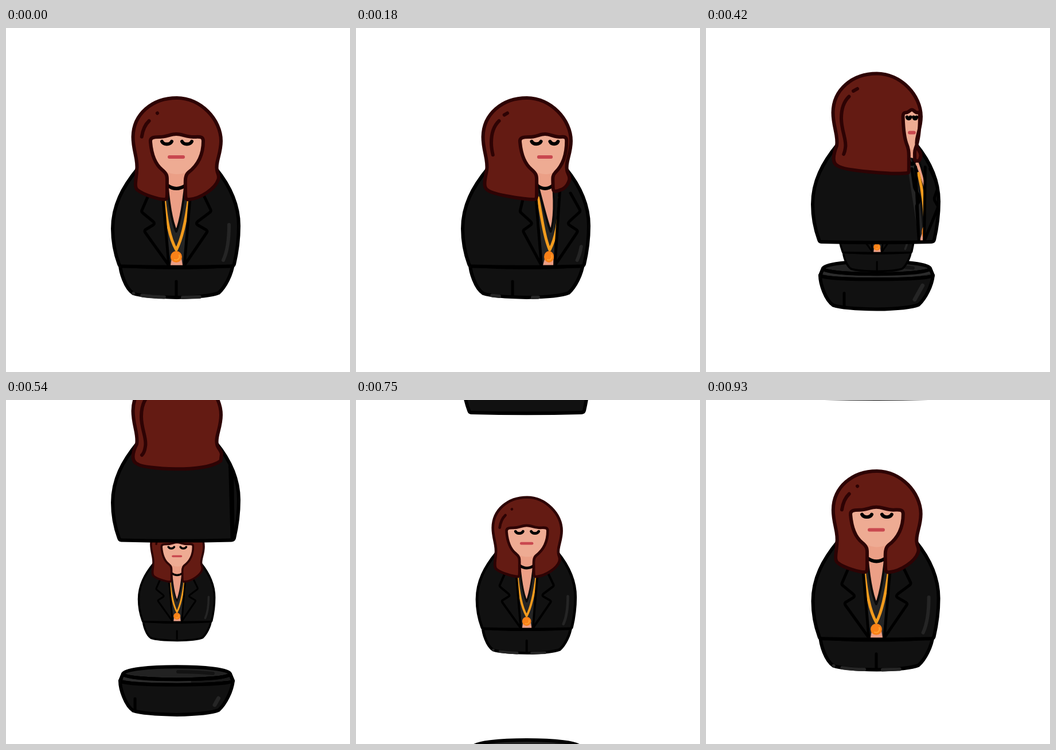
Write an HTML page with a canvas that moves like this. It is 600 px wide and 600 px high and loops after 0.96 s.

```html
<!DOCTYPE html>
<html lang="en">
<head>
<meta charset="utf-8">
<title>Nesting doll</title>
<style>
html, body { margin: 0; width: 100%; height: 100%; overflow: hidden; background: #fff; }
canvas { display: block; width: 600px; height: 600px; }
</style>
</head>
<body>
<canvas id="stage" width="600" height="600"></canvas>
<script>
const ctx = document.getElementById('stage').getContext('2d');
const LOOP = 960, STEP = 30, TURN = 540, MID = 297;
const HAIR = '#641b13', HAIR_LINE = '#2d0304', COAT = '#111', GREY = '#252525';
const FACE = '#eeab93', NECK = '#eb9f86', GOLD = '#f29b1d';

const clamp = v => Math.max(0, Math.min(1, v));

// Bezier easing with flat ends, run from time a to time b
function ease(t, a, b, x1, x2) {
  const x = clamp((t - a) / (b - a));
  let lo = 0, hi = 1;
  for (let i = 0; i < 24; i++) {
    const s = (lo + hi) / 2, r = 1 - s;
    if (3 * s * r * r * x1 + 3 * s * s * r * x2 + s ** 3 < x) lo = s; else hi = s;
  }
  return lo * lo * (3 - 2 * lo);
}

function pose(t) {
  const turn = t / TURN, u = clamp(turn), rest = 1 - u;
  return {
    u,
    lift: 419 * ease(t, 180, LOOP, .73, .23),
    drop: 221 * ease(t, 180, LOOP, .75, .25),
    scale: .6 + .4 * ease(t, 600, LOOP, .35, .5),
    sink: (LOOP - t) / 24,
    faceL: 252 + 123 * u ** 1.17,
    faceR: 344 + 29 * (1 - rest ** 4),
    lobeL: 22 * u ** 7,
    lobeR: 26 * (1 - rest ** 2),
    shift: turn ** .87,
    squeeze: Math.max(.08, Math.cos(u * Math.PI / 2)),
    coatShine: 64 * (1 - 1.83 * u),
    seam: MID - 72 * turn,
    marks: clamp(1 - 2 * u),
    newMarks: clamp((t - 660) / 90),
    bowlShine: clamp(1 - Math.abs(t - 420) / 230),
    rimEnd: Math.max(200, 731 - .756 * t),
    inside: Math.min(360, 300 + Math.abs(t - TURN) / 3)
  };
}

// Pass every "x y" pair of a path through a mapping
const warp = (d, map) => d.replace(/(-?[\d.]+) (-?[\d.]+)/g, (_, x, y) => map(+x, +y).join(' '));

function fill(d, color) {
  ctx.fillStyle = color;
  ctx.fill(new Path2D(d));
}

function line(d, color, width, length) {
  if (length <= 0) return;
  ctx.strokeStyle = color;
  ctx.lineWidth = width;
  ctx.setLineDash(length ? [length, 999] : []);
  ctx.stroke(new Path2D(d));
}

function shape(d, color, edge = '#000', width = 6) {
  fill(d, color);
  line(d, edge, width);
}

function clipped(d, draw) {
  ctx.save();
  ctx.clip(new Path2D(d));
  draw();
  ctx.restore();
}

const BOWL = 'M199 411 C206 420 390 420 396 411 C394 429 383 451 371 462 Q354 469 298 470 Q240 469 222 463 C208 454 199 425 199 411 Z';
const RIM = 'M204 399 C206 411.7 390 411.7 391 399 L396 411 C390 420 206 420 199 411 Z';
const OPENING = 'M204 399 C206 382.3 390 382.3 391 399 C390 411.7 206 411.7 204 399 Z';
const TORSO = 'M197 412 C189 390 186 370 186 350 C186 310 203 278 230 245 L366 245 C393 278 406 312 406 345 C406 372 402 395 398 412 Q397 415.5 393 415.5 Q298 418 201 415.5 Q198 415.5 197 412 Z';

function bowlBack(p) {
  shape(OPENING, '#222');
  line(`M${p.inside} 395 Q335 395 361 398`, '#131313', 6);
}

function bowlFront(p) {
  shape(RIM, '#191919');
  clipped(`M200 395 H${p.rimEnd} V425 H200 Z`, () =>
    line('M206 407 C240 416 350 416 391 406', '#2b2b2b', 5));
  line(RIM, '#000', 6);
  fill(BOWL, COAT);
  clipped(BOWL, () => line(`M${p.seam} 442 V472`, '#000', 5));
  line('M364 453 L378 428', GREY, 7, 28 * p.bowlShine);
  line(BOWL, '#000', 6);
  line('M222 462.5 L223 463', GREY, 5, 3 * p.marks - 2);
  line('M237 466.5 Q255 469 276 469.5', GREY, 6, 40 * p.marks);
  line('M308 470 L338 469', GREY, 6, 30 * p.marks);
}

function chest(p) {
  const map = (x, y) => {
    const girth = 111 - (y < 345 ? .0043 : .0027) * (y - 345) ** 2;
    return [MID + girth * p.shift + p.squeeze * (x - MID), y];
  };
  const w = d => warp(d, map);
  if (p.squeeze > .15) {
    fill(w('M272 250 L322 250 L310 415 L285 415 Z'), GREY);
    shape(w('M280 255 C283 300 289 338 297 355 C304 338 311 300 314 255 Z'), NECK, '#0a0a0a', 4);
    fill(w('M289 401 L306 401 L308 414 L287 414 Z'), NECK);
    line(w('M276 296 C280 335 285 366 297 387 C308 366 314 335 319 296'), GOLD, 5);
    ctx.save();
    ctx.translate(...map(MID, 399));
    ctx.scale(p.squeeze, 1);
    fill('M-10 0 A10 10 0 0 1 10 0 A10 10 0 0 1 -10 0 Z', '#f98118');
    line('M5 -3 A6 6 0 0 1 -3 5', '#ffa12f', 2);
    ctx.restore();
  }
  const left = 'M250 288 L237 318 Q236 321 239 323 L256 337 Q261 341 256 344 L243 352 Q241 354 243 357 L284 414 L273 285';
  const right = 'M343 288 L357 317 Q358 320 355 322 L335 337 Q330 341 335 344 L349 352 Q352 354 350 357 L311 414 L322 285';
  for (const d of [left, right]) shape(w(d), COAT, '#000', 5);
}

function head(p) {
  const { u, lobeL: a, lobeR: b } = p;
  const width = p.faceR - p.faceL, open = width > 8;
  const bulge = .23 * Math.sin(Math.PI * u);
  const map = (x, y) => {
    const f = (x - 252) / 92;
    return [p.faceL + width * (f + bulge * f * (1 - f)), y];
  };
  const w = d => warp(d, map), m = x => map(x)[0];
  const inner = w(`C313 ${270 - b / 2} 311 258 318 252 C334 240 344 222 344 197 C344 188 336 190 327 190
    C315 190 307 185 297 185 C287 185 280 190 268 190 C257 190 251 191 252 199
    C254 222 261 238 272 247 C282 255 281 260 281 268`);
  const outer = `M${m(276)} ${299 - a} C${m(276) * .8 + 46} 299 240 291 230 283
    C${222 - 5 * u} 278 ${228 - 7 * u} 262 228 248 C231 230 221.5 215 221.5 190
    C222 150 255 122 298 122 C340 122 375 160 375 197 C375 220 365 234 368 248
    C369 255 ${373 + 2 * u} 258 ${370 + 6 * u} 265`;
  const lobe = ` C${365 + 9 * u} 280 ${m(320) * .6 + 148} ${297 - b} ${m(320)} ${299 - b}
    C${m(313)} ${300 - b} ${m(313)} ${296 - b} ${m(313)} ${288 - b} `;
  const end = ` L${m(281)} ${290 - a} C${m(281)} ${297 - a} ${m(280)} ${299 - a} ${m(276)} ${299 - a} Z`;

  if (open) {
    const skin = `M${m(313)} 270 ${inner} Z`, dip = 204 - 4 * u * u;
    fill(skin, NECK);
    clipped(skin, () => {
      fill(w('M245 180 L350 180 L346 215 C340 240 318 255 298 255 C278 255 256 240 250 215 Z'), FACE);
      for (const x of [272, 307]) line(w(`M${x} 198 C${x + 3} ${dip} ${x + 14} ${dip} ${x + 17} 198`), '#000', 6);
      line(w('M285 225 L309 225'), '#c9484f', 6);
    });
    line(w('M281 274 Q297 286 314 274'), '#000', 6);
  }
  shape(open ? outer + lobe + inner + end : outer + ' Z', HAIR, HAIR_LINE);
  line('M264 148.5 L257 152.5', HAIR_LINE, 6, Math.min(8, .1 + 18 * u));
  line('M249.5 162 C239 172 236 188 236 200 C236 222 246 238 243 252 C242 260 240 264 237 267', HAIR_LINE, 6, 31 + 95 * u);
}

function upper(p) {
  const x = 20 * p.u;
  fill(TORSO, COAT);
  clipped(TORSO, () => chest(p));
  line(`M${379 + x} 405 C${386 + x} 390 ${389 + x} 370 ${389 + x} 343`, GREY, 6, p.coatShine);
  line(TORSO, '#000', 6);
  head(p);
}

function shifted(dy, draw) {
  ctx.save();
  ctx.translate(0, dy);
  draw();
  ctx.restore();
}

function render(t) {
  const p = pose(t), rest = { ...pose(0), marks: p.newMarks };
  ctx.fillStyle = '#fff';
  ctx.fillRect(0, 0, 600, 600);

  shifted(p.drop, () => bowlBack(p));
  ctx.save();
  ctx.translate(300, 300 + p.sink);
  ctx.scale(p.scale, p.scale);
  ctx.translate(-300, -300);
  bowlFront(rest);
  upper(rest);
  ctx.restore();
  shifted(p.drop, () => bowlFront(p));
  shifted(-p.lift, () => upper(p));
}

ctx.lineCap = ctx.lineJoin = 'round';
const start = performance.now();
function tick() {
  const t = (performance.now() - start) % LOOP;
  render(Math.floor(t / STEP) * STEP);
  requestAnimationFrame(tick);
}
tick();
</script>
</body>
</html>
```
